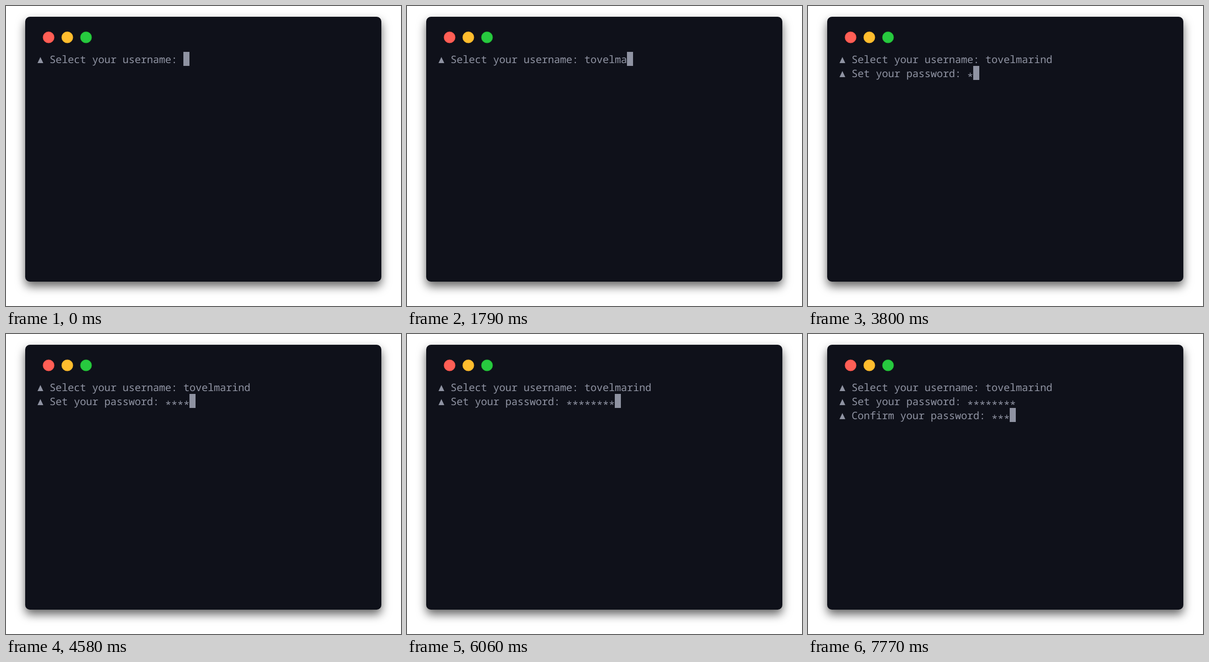
An HTML page that plays this animation: 844x641 px, repeating every 8 s.

```html
<!DOCTYPE html>
<html lang="en">
<head>
<meta charset="utf-8">
<title>Sign-up prompt</title>
<style>
  html, body { margin: 0; width: 100%; height: 100%; overflow: hidden; background: #fff; }
  .window {
    position: absolute; left: 41px; top: 23px; width: 761px; height: 566px;
    border-radius: 10px; background: #0f111a;
    box-shadow: 0 10px 20px rgba(0, 0, 0, .6);
  }
  svg { position: absolute; left: 0; top: 0; }
  text, .mark, #cursor { fill: #8f93a2; }
  text {
    font: 22px "Roboto Mono", "Noto Sans Mono", "DejaVu Sans Mono", monospace;
    letter-spacing: -.2px;
    text-rendering: geometricPrecision;
    white-space: pre;
  }
</style>
</head>
<body>
<div class="window"></div>
<svg id="stage" width="844" height="641" viewBox="0 0 844 641">
  <circle cx="91" cy="67" r="12" fill="#ff5f56" stroke="#e0443e"/>
  <circle cx="131" cy="67" r="12" fill="#ffbd2e" stroke="#dea123"/>
  <circle cx="171" cy="67" r="12" fill="#27c93f" stroke="#1aab29"/>
  <rect id="cursor" width="13" height="30"/>
</svg>
<script>
  const LOOP = 8000, CELL = 13, ROW = 30, LEFT = 67, TOP = 98;
  const STAR_DROP = 7; // asterisks sit at mid-height of the row

  const lines = [
    { start: 0, prompt: "Select your username:", answer: "tovelmarind",
      keys: [80, 400, 630, 930, 1330, 1560, 1790, 2020, 2250, 2330, 2410] },
    { start: 2940, prompt: "Set your password:", answer: "********",
      keys: [3800, 4030, 4410, 4580, 4900, 5200, 5830, 6060] },
    { start: 6610, prompt: "Confirm your password:", answer: "***",
      keys: [7070, 7370, 7770] }
  ];

  const stage = document.getElementById("stage");
  const cursor = document.getElementById("cursor");

  function add(parent, tag, attrs, content = "") {
    const node = document.createElementNS("http://www.w3.org/2000/svg", tag);
    for (const name in attrs) node.setAttribute(name, attrs[name]);
    node.textContent = content;
    return parent.appendChild(node);
  }

  lines.forEach((line, row) => {
    const baseline = TOP + row * ROW + 24;
    line.top = TOP + row * ROW;
    line.inputX = LEFT + CELL * (line.prompt.length + 3);
    line.group = add(stage, "g", {});
    add(line.group, "path", { class: "mark", d: `M67.3 ${baseline}l6.2-13 6.2 13z` });
    add(line.group, "text", { x: LEFT + 2 * CELL, y: baseline }, line.prompt);
    const drop = line.answer[0] === "*" ? STAR_DROP : 0;
    line.input = add(line.group, "text", { x: line.inputX, y: baseline + drop });
  });

  function draw(time) {
    for (const line of lines) {
      const shown = time >= line.start;
      line.group.setAttribute("visibility", shown ? "visible" : "hidden");
      if (!shown) continue;
      const typed = line.keys.filter(key => time >= key).length;
      line.input.textContent = line.answer.slice(0, typed);
      cursor.setAttribute("x", line.inputX + typed * CELL);
      cursor.setAttribute("y", line.top);
    }
  }

  const begin = performance.now();
  function tick() {
    draw((performance.now() - begin) % LOOP);
    requestAnimationFrame(tick);
  }
  tick();
</script>
</body>
</html>
```
